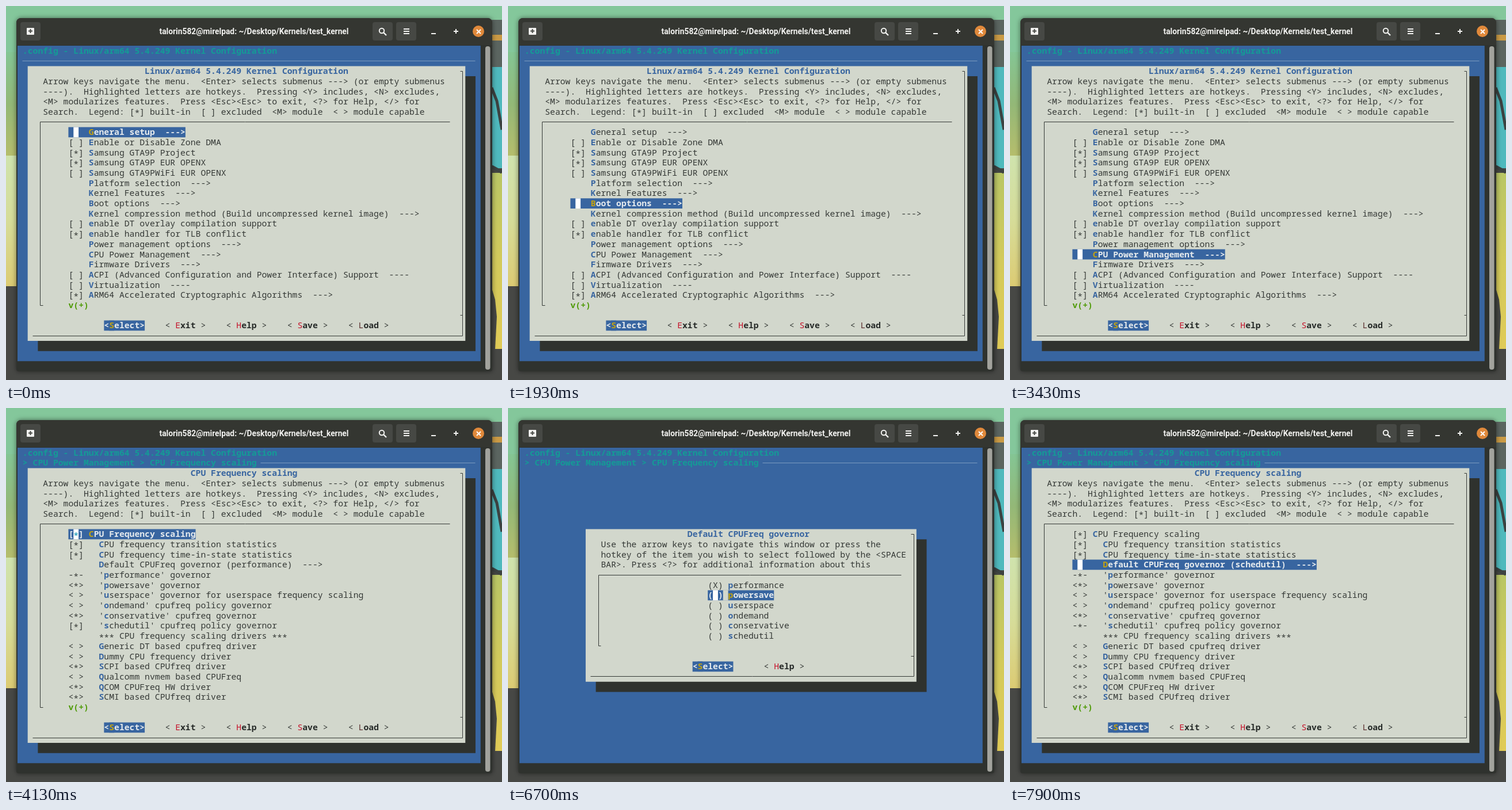
Recreate the animation shown at these times as an HTML page with a canvas. Size 862 by 650 pixels, loop 8 s.

```html
<!DOCTYPE html>
<html lang="en">
<head>
<meta charset="utf-8">
<title>Kernel configuration</title>
<style>
html, body { margin: 0; height: 100%; overflow: hidden; background: #474845; }
canvas { display: block; }
</style>
</head>
<body>
<canvas id="stage" width="862" height="650"></canvas>
<script>
const ctx = document.getElementById('stage').getContext('2d');
const LOOP = 8000, FONT = 14.74, CW = FONT * 0.6, RH = FONT * 1.2;
const BLUE = '#3865a0', PANEL = '#d2d7cc', INK = '#353936', DARK = '#2f322e',
      TEAL = '#149b96', RED = '#c4122a', GOLD = '#c4a210', LIGHT = '#e6ebee', GREEN = '#4e9a06';

const menuHelp = [
  'Arrow keys navigate the menu.  <Enter> selects submenus ---> (or empty submenus',
  '----).  Highlighted letters are hotkeys.  Pressing <Y> includes, <N> excludes,',
  '<M> modularizes features.  Press <Esc><Esc> to exit, <?> for Help, </> for',
  'Search.  Legend: [*] built-in  [ ] excluded  <M> module  < > module capable'];
const menu = { c: 2, r: 2, w: 86, h: 27, help: menuHelp, itemCol: 10, button: 17, step: 12,
  buttons: ['Exit', 'Help', 'Save', 'Load'] };

const freqItems = (governor, schedutil) => [
  '[*] CPU Frequency scaling',
  '[*]   CPU frequency transition statistics',
  '[*]   CPU frequency time-in-state statistics',
  `      Default CPUFreq governor (${governor})  --->`,
  "-*-   'performance' governor",
  "<*>   'powersave' governor",
  "< >   'userspace' governor for userspace frequency scaling",
  "< >   'ondemand' cpufreq policy governor",
  "<*>   'conservative' cpufreq governor",
  `${schedutil}   'schedutil' cpufreq policy governor`,
  '      *** CPU frequency scaling drivers ***',
  '< >   Generic DT based cpufreq driver',
  '< >   Dummy CPU frequency driver',
  '<*>   SCPI based CPUfreq driver',
  '< >   Qualcomm nvmem based CPUFreq',
  '<*>   QCOM CPUFreq HW driver',
  '<*>   SCMI based CPUfreq driver'];

const powerPath = '> CPU Power Management', freqPath = powerPath + ' > CPU Frequency scaling';

// Each screen lists the times at which the highlight reaches its successive items.
const screens = [
  { ...menu, title: 'Linux/arm64 5.4.249 Kernel Configuration', path: '', more: true,
    times: [0, 900, 1100, 1270, 1430, 1600, 1770, 1930, 2130, 2300, 2470, 2630, 3000],
    items: [
      '    General setup  --->',
      '[ ] Enable or Disable Zone DMA',
      '[*] Samsung GTA9P Project',
      '[*] Samsung GTA9P EUR OPENX',
      '[ ] Samsung GTA9PWiFi EUR OPENX',
      '    Platform selection  --->',
      '    Kernel Features  --->',
      '    Boot options  --->',
      '    Kernel compression method (Build uncompressed kernel image)  --->',
      '[ ] enable DT overlay compilation support',
      '[*] enable handler for TLB conflict',
      '    Power management options  --->',
      '    CPU Power Management  --->',
      '    Firmware Drivers  --->',
      '[ ] ACPI (Advanced Configuration and Power Interface) Support  ----',
      '[ ] Virtualization  ----',
      '[*] ARM64 Accelerated Cryptographic Algorithms  --->'] },
  { ...menu, title: 'CPU Power Management', path: powerPath, times: [3470, 3830],
    items: ['    CPU Idle  --->', '    CPU Frequency scaling  --->'] },
  { ...menu, title: 'CPU Frequency scaling', path: freqPath, more: true,
    times: [4130, 4830, 5000, 5200], items: freqItems('performance', '[*]') },
  { c: 13, r: 8, w: 65, h: 15, title: 'Default CPUFreq governor', path: freqPath, radio: true,
    help: ['Use the arrow keys to navigate this window or press the',
           'hotkey of the item you wish to select followed by the <SPACE',
           'BAR>. Press <?> for additional information about this'],
    itemCol: 37, button: 34, step: 14, buttons: ['Help'],
    times: [5830, 6500, 6730, 6900, 7100, 7430],
    items: ['(X) performance', '( ) powersave', '( ) userspace',
            '( ) ondemand', '( ) conservative', '( ) schedutil'] },
  { ...menu, title: 'CPU Frequency scaling', path: freqPath, more: true, first: 3,
    times: [7900], items: freqItems('schedutil', '-*-') }
];

const X = col => 20 + col * CW, Y = row => 69 + row * RH;

function rect(x, y, w, h, color, radius = 0) {
  ctx.fillStyle = color;
  ctx.beginPath();
  ctx.roundRect(x, y, w, h, radius);
  ctx.fill();
}
const cells = (c, r, w, h, color) => rect(X(c), Y(r), w * CW, h * RH, color);

function shape(color, ...points) {
  ctx.fillStyle = color;
  ctx.beginPath();
  points.forEach(p => ctx.lineTo(...p));
  ctx.fill();
}

function line(color, width, ...points) {
  ctx.strokeStyle = color;
  ctx.lineWidth = width;
  ctx.beginPath();
  points.forEach(p => ctx.lineTo(...p));
  ctx.stroke();
}

// One-pixel line through grid positions.
const rule = (color, ...points) =>
  line(color, 1, ...points.map(([c, r]) => [Math.floor(X(c)) + .5, Math.floor(Y(r)) + .5]));

function put(c, r, text, color = INK, bold = false) {
  ctx.font = `${bold ? 'bold ' : ''}${FONT}px "Noto Sans Mono", monospace`;
  ctx.fillStyle = color;
  [...text].forEach((ch, i) => {
    if (ch !== ' ') ctx.fillText(ch, X(c + i), Y(r) + 13.8 + (ch === '*' ? 2.5 : 0));
  });
}

function fade(x, y, w, h, ...colors) {
  const g = ctx.createLinearGradient(0, y, 0, y + h);
  colors.forEach((color, i) => g.addColorStop(i / (colors.length - 1), color));
  rect(x, y, w, h, g);
}

function drawDesktop() {
  rect(0, 0, 862, 650, '#474845');
  rect(0, 0, 862, 80, '#84c79b');
  fade(0, 80, 20, 180, '#84c594', '#93b877', '#b5bd6c');
  fade(0, 260, 20, 227, '#cfe3ad', '#d6dc98', '#dccb73');
  rect(844, 24, 18, 82, '#5b6560');
  rect(844, 50, 18, 10, '#c99a45');
  rect(844, 106, 18, 176, '#4fb9bd');
  line('#3c4241', 5, [844, 142], [853, 165], [862, 215]);
  fade(844, 290, 18, 306, '#b9c665', '#d3ca5c', '#e0cb57');
  line('#3c4241', 6, [844, 279], [862, 289]);
  shape('#474845', [844, 490], [850, 510], [853, 540], [850, 596], [844, 596]);
}

function drawWindow() {
  ctx.shadowColor = 'rgba(0,0,0,.5)';
  ctx.shadowBlur = 8;
  rect(18, 21, 827, 614, DARK, [8, 8, 4, 4]);
  ctx.shadowBlur = 0;
  rect(18, 21, 827, 47, '#343631', [8, 8, 0, 0]);
  for (const x of [25, 637, 678]) rect(x, 28, 35, 32, '#464844', 4);

  rect(36, 38, 13, 12, '#f2f2f0', 1);
  line('#464844', 2, [42.5, 40], [42.5, 47]);
  line('#464844', 2, [39, 43.5], [46, 43.5]);

  ctx.strokeStyle = '#f2f2f0';
  ctx.lineWidth = 2;
  ctx.beginPath();
  ctx.arc(653, 43, 4.2, 0, 7);
  ctx.stroke();
  line('#f2f2f0', 2.4, [656, 46], [661, 51]);
  for (const y of [40, 44, 48]) line('#f2f2f0', 2, [691, y], [701, y]);
  line('#f2f2f0', 2, [739, 48], [747, 48]);
  line('#f2f2f0', 2, [778, 44], [786, 44]);
  line('#f2f2f0', 2, [782, 40], [782, 48]);
  rect(811, 34, 20, 20, '#e0893b', 10);
  line('#fff', 2, [818, 41], [825, 48]);
  line('#fff', 2, [825, 41], [818, 48]);

  ctx.font = 'bold 13.8px Roboto, sans-serif';
  ctx.textAlign = 'center';
  ctx.fillStyle = '#f2f2f0';
  ctx.fillText('talorin582@mirelpad: ~/Desktop/Kernels/test_kernel', 431, 48.5);
  ctx.textAlign = 'left';
  rect(833, 70, 8.5, 562, '#a2a39d', 4);
}

function drawButtons(s) {
  const row = s.r + s.h - 2;
  cells(s.button, row, 8, 1, BLUE);
  put(s.button, row, '<Select>', LIGHT, true);
  cells(s.button + 1, row, 1, 1, BLUE);
  put(s.button + 1, row, 'S', GOLD, true);
  s.buttons.forEach((name, i) => {
    const c = s.button + 12 + s.step * 0 + (s.radio ? 2 : 0) + i * s.step;
    put(c, row, '<      >');
    put(c + 2, row, name[0], name === 'Load' ? '#5c3030' : RED);
    put(c + 3, row, name.slice(1), '#262a28', true);
  });
}

function drawItem(s, text, row, selected) {
  const c = s.itemCol;
  const hot = text.includes('***') ? -1 : 4 + text.slice(4).search(/[a-z]/i);
  if (selected) {
    cells(c, row, text.length, 1, BLUE);
    if (s.radio) cells(c + 3, row, 1, 1, PANEL);
    cells(c + 1, row, 1, 1, '#fff');
  }
  [...text].forEach((ch, i) => {
    const color = i === hot ? (selected ? GOLD : BLUE)
      : !selected ? INK : i === 1 ? '#35a5c0' : LIGHT;
    put(c + i, row, ch, color, selected || i === hot);
  });
}

function drawDialog(s, index) {
  const { c, r, w, h } = s, right = c + w - .5, bottom = r + h - .5;
  const listTop = r + s.help.length + 1, listEnd = r + h - 3.5;
  cells(c + 2, r + 1, w, h, DARK);
  cells(c, r, w, h, PANEL);
  rule(INK, [right - .5, r + .5], [right, r + .5], [right, bottom], [c + 1, bottom]);
  rule(INK, [right - .5, r + h - 2.5], [right, r + h - 2.5]);
  rule(INK, [c + w - 3, listTop + .5], [c + 2.5, listTop + .5], [c + 2.5, listEnd], [c + 3, listEnd]);
  put(c + Math.floor((w - s.title.length) / 2), r, s.title, BLUE, true);
  s.help.forEach((text, i) => put(c + 3, r + 1 + i, text));
  s.items.forEach((text, i) => drawItem(s, text, listTop + 1 + i, i === index));
  if (s.more) put(s.itemCol, r + h - 4, 'v(+)', GREEN, true);
  drawButtons(s);
}

function draw(s, index) {
  drawDesktop();
  drawWindow();
  cells(0, 0, 91, 31, BLUE);
  put(1, 0, '.config - Linux/arm64 5.4.249 Kernel Configuration', TEAL, true);
  put(1, 1, s.path, TEAL, true);
  rule('#7b9bc0', [s.path ? s.path.length + 1.8 : 1, 1.5], [90, 1.5]);
  drawDialog(s, index);
}

let shown = '';
function tick() {
  const t = performance.now() % LOOP;
  const s = screens.findLast(screen => screen.times[0] <= t);
  const index = (s.first || 0) + s.times.findLastIndex(time => time <= t);
  const key = s.times[0] + ':' + index;
  if (key !== shown) draw(s, index);
  shown = key;
  requestAnimationFrame(tick);
}
tick();
</script>
</body>
</html>
```
